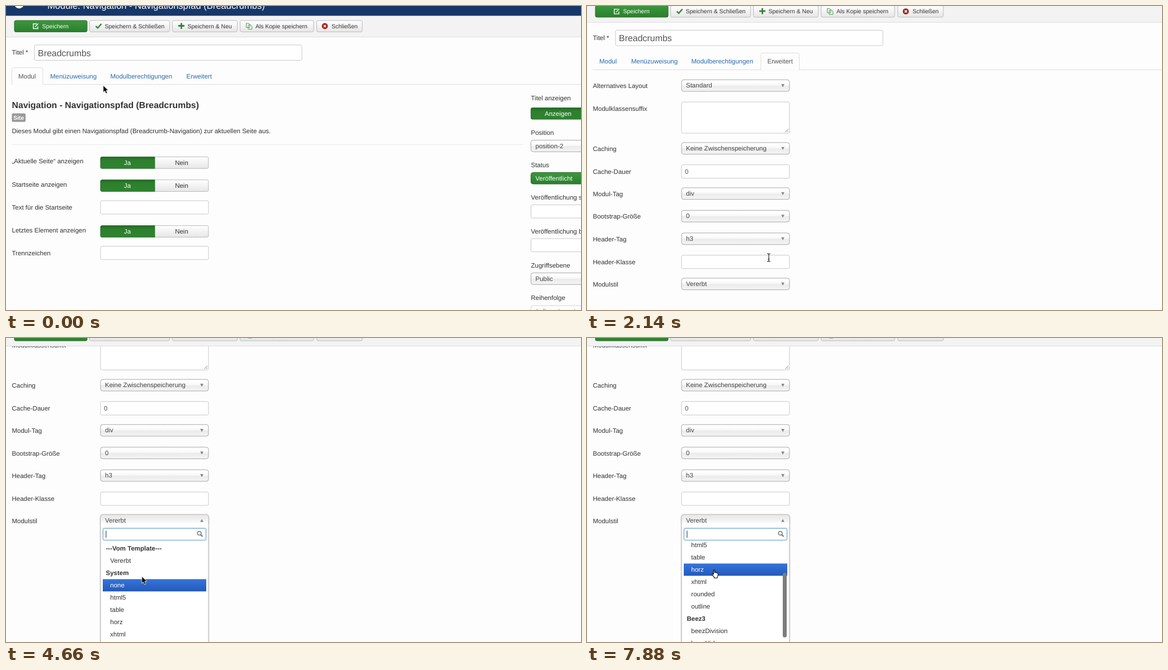
An HTML page for the animation above (8000 ms loop, 1028 px wide and 545 px high).

```html
<!DOCTYPE html>
<html lang="de">
<head>
<meta charset="utf-8">
<title>Modul bearbeiten</title>
<style>
  html, body { margin: 0; width: 100%; height: 100%; overflow: hidden; background: #fdfdfd; }
  svg { display: block; width: 1028px; height: 545px; }
  text { font-family: "Liberation Sans", Arial, sans-serif; white-space: pre; text-rendering: geometricPrecision; }
</style>
</head>
<body>
<svg id="stage" viewBox="0 0 1028 545" xmlns="http://www.w3.org/2000/svg">
  <defs>
    <linearGradient id="green" x2="0" y2="1"><stop stop-color="#3c973d"/><stop offset="1" stop-color="#2b7f2d"/></linearGradient>
    <linearGradient id="pressed" x2="0" y2="1"><stop stop-color="#236a25"/><stop offset=".3" stop-color="#2d802e"/><stop offset="1" stop-color="#2f8330"/></linearGradient>
    <linearGradient id="grey" x2="0" y2="1"><stop stop-color="#fff"/><stop offset="1" stop-color="#e6e6e6"/></linearGradient>
    <linearGradient id="select" x2="0" y2="1">
      <stop offset=".2" stop-color="#fff"/><stop offset=".5" stop-color="#f6f6f6"/>
      <stop offset=".52" stop-color="#ebebeb"/><stop offset="1" stop-color="#f4f4f4"/>
    </linearGradient>
    <linearGradient id="open" x2="0" y2="1">
      <stop offset=".2" stop-color="#ebebeb"/><stop offset=".55" stop-color="#f6f6f6"/><stop offset=".8" stop-color="#fff"/>
    </linearGradient>
    <linearGradient id="blue" x2="0" y2="1"><stop stop-color="#3674da"/><stop offset=".9" stop-color="#265cbd"/></linearGradient>
    <clipPath id="listClip"><path d="M170 366H361V581H170Z"/></clipPath>
  </defs>
  <g id="page">
    <g id="form"></g>
    <g id="tabs"></g>
    <g id="modul"></g>
    <g id="advanced"></g>
    <g id="drop" transform="translate(0 197.1)"></g>
  </g>
  <g id="bar"></g>
  <g id="cursors">
    <path id="arrow" fill="#000" stroke="#fff" stroke-width=".8" d="M.4 .4V12.8L3.2 10.2L5.3 15L7.6 14L5.5 9.3H9.3Z"/>
    <path id="hand" fill="#fff" stroke="#000" stroke-width="1.1" stroke-linejoin="round"
      d="M3.2 8.5V1.4Q4.2 -.3 5.2 1.4V5.2Q6.3 4.2 7.2 5.5Q8.5 4.6 9.3 6Q10.6 5.4 11.2 6.8V10Q11 12 9.9 13.2V15H4.4V13.4Q2.4 11.4 .6 8.8Q.8 7 2.2 7.8Z"/>
    <path id="beam" fill="none" stroke="#222" stroke-width="1.2" d="M-3 -7Q0 -7 0 -5.5Q0 -7 3 -7M0 -5.5V5.5M-3 7Q0 7 0 5.5Q0 7 3 7M-1.6 2.5H1.6"/>
  </g>
</svg>
<script>
const $ = id => document.getElementById(id);

const text = (x, y, s, { size = 11.5, fill = '#333', bold = false, anchor = 'start' } = {}) =>
  `<text x="${x}" y="${y}" font-size="${size}" fill="${fill}" text-anchor="${anchor}"${bold ? ' font-weight="700"' : ''}>${s.replace(/&/g, '&amp;')}</text>`;
const rect = (x, y, w, h, fill, stroke = 'none', r = 2.6) =>
  `<rect x="${x}" y="${y}" width="${w}" height="${h}" rx="${r}" fill="${fill}" stroke="${stroke}"/>`;
const path = (d, fill, stroke = 'none', width = 1) =>
  `<path d="${d}" fill="${fill}" stroke="${stroke}" stroke-width="${width}"/>`;

const label = (x, y, s) => text(x, y + 4, s);
const input = (x, y, w, h, s = '') => rect(x, y, w, h, '#fff', '#c8c8c8') + text(x + 6, y + 16, s, { fill: '#555' });
const select = (y, s, x = 169) =>
  rect(x, y - 10.3, 193, 20.8, 'url(#select)', '#a8a8a8', 4) +
  text(x + 8, y + 3.8, s, { fill: '#444' }) +
  path(`M${x + 178.2} ${y - 2.5}h5.8l-2.9 5.4z`, '#888');
const toggle = y =>
  rect(169, y - 10.3, 193, 20.8, 'url(#grey)', '#bbb') +
  path(`M266 ${y - 10.3}H171.6Q169 ${y - 10.3} 169 ${y - 7.7}V${y + 8}Q169 ${y + 10.5} 171.6 ${y + 10.5}H266Z`, 'url(#pressed)', '#2a6d2b', .8) +
  text(217, y + 3.8, 'Ja', { fill: '#fff', anchor: 'middle' }) +
  text(314, y + 3.8, 'Nein', { anchor: 'middle' });

// Header and sticky toolbar
const buttons = [
  [15, 130, 64.5, 'Speichern'], [149.5, 143, 176.5, 'Speichern & Schließen'], [297.5, 116, 324.5, 'Speichern & Neu'],
  [418.5, 131.5, 446, 'Als Kopie speichern'], [555.5, 81.5, 582, 'Schließen']
];
$('bar').innerHTML =
  path('M0 0H1028V56H0Z', '#f3f3f3') + path('M0 55.7H1028', 'none', '#dedede') + path('M0 -20H1028V17.4H0Z', '#173768') +
  '<circle cx="23.5" cy="-4" r="8.5" fill="#fff"/>' +
  text(74, 4.6, 'Module: Navigation - Navigationspfad (Breadcrumbs)', { size: 16.55, fill: '#fff' }) +
  buttons.map(([x, w, tx, s], i) =>
    rect(x, 26, w, 20.4, i ? 'url(#grey)' : 'url(#green)', i ? '#bcbcbc' : '#2a6d2b') +
    text(tx, 39.7, s, { size: 10.5, fill: i ? '#333' : '#fff' })).join('') +
  path('M55 32H48.8V40.5H57V36.5M52 37.5L57.5 31.5', 'none', '#fff', 1.4) +
  path('M160.5 36L164 39.5L170.5 32', 'none', '#378137', 2.4) +
  path('M308 35.5H319M313.5 30.5V41', 'none', '#378137', 2.8) +
  path('M429.5 31H434L436 33V38.5H429.5ZM433 34H437.5L439.7 36V41.5H433Z', '#f4f8f4', '#4f9550', 1) +
  '<circle cx="570" cy="36" r="5.4" fill="#a5211b"/>' + path('M568 34L572 38M572 34L568 38', 'none', '#fff', 1.5);

$('form').innerHTML = label(10.5, 83, 'Titel *') + rect(51, 69.8, 478, 27.6, '#fff', '#c8c8c8') +
  text(57, 89.5, 'Breadcrumbs', { size: 15.95, fill: '#555' });

const tabs = [[10.5, 55.5, 22, 'Modul'], [67.5, 105.5, 79, 'Menüzuweisung'], [175, 134, 186.5, 'Modulberechtigungen'], [311, 68.5, 322.5, 'Erweitert']];
const drawTabs = (active, hover) => path('M10 140.7H1028', 'none', '#ddd') +
  tabs.map(([x, w, tx, s], i) => {
    const shape = `M${x} 141.2V114Q${x} 110.5 ${x + 3.5} 110.5H${x + w - 3.5}Q${x + w} 110.5 ${x + w} 114V141.2`;
    const back = i === active ? path(shape, '#fdfdfd', '#ddd') : i === hover ? path(shape, '#eee') : '';
    return back + text(tx, 129.7, s, { fill: i === active ? '#555' : i === hover ? '#1b4a80' : '#2a6bb0' });
  }).join('');

// First tab
const publish = [[165, 'Titel anzeigen'], [227, 'Position'], [285, 'Status'], [343, 'Veröffentlichung starten'],
  [404, 'Veröffentlichung beenden'], [464.5, 'Zugriffsebene'], [522.5, 'Reihenfolge']];
$('modul').innerHTML =
  text(10.5, 183, 'Navigation - Navigationspfad (Breadcrumbs)', { size: 15.8, bold: true }) +
  rect(10.5, 192.5, 24.5, 15.3, '#999') + text(22.8, 204, 'Site', { size: 10.4, fill: '#fff', bold: true, anchor: 'middle' }) +
  label(10.5, 224.3, 'Dieses Modul gibt einen Navigationspfad (Breadcrumb-Navigation) zur aktuellen Seite aus.') +
  path('M10 248.5H925', 'none', '#eaeaea') +
  [[278, '„Aktuelle Seite“ anzeigen'], [319.5, 'Startseite anzeigen'], [360.5, 'Text für die Startseite'],
   [401.5, 'Letztes Element anzeigen'], [442.5, 'Trennzeichen']].map(([y, s]) => label(10.5, y, s)).join('') +
  [280.8, 322, 404].map(toggle).join('') + input(169, 349, 193, 24) + input(169, 430.7, 193, 24) +
  publish.map(([y, s]) => label(938.5, y, s)).join('') +
  rect(938.5, 182.5, 98, 20.5, 'url(#pressed)', '#2a6d2b') + text(963, 196.6, 'Anzeigen', { fill: '#fff' }) +
  select(250.8, 'position-2', 938.5) +
  rect(938.5, 298.5, 193, 20.6, 'url(#green)', '#2a6d2b', 4) + text(946.5, 312.8, 'Veröffentlicht', { fill: '#fff' }) +
  input(938.5, 356.5, 193, 23.6) + input(938.5, 417, 193, 23.6) +
  select(488.8, 'Public', 938.5) + rect(938.5, 537, 193, 20.8, '#fdfdfd', '#d4d4d4', 4) +
  text(946.5, 550.6, '1. Breadcrumbs', { fill: '#aaa' });

// Fourth tab
const rows = [[169.3, 'Alternatives Layout', 'Standard'], [210, 'Modulklassensuffix'], [282, 'Caching', 'Keine Zwischenspeicherung'],
  [322.8, 'Cache-Dauer'], [363, 'Modul-Tag', 'div'], [403.5, 'Bootstrap-Größe', '0'], [444, 'Header-Tag', 'h3'],
  [484.8, 'Header-Klasse'], [525, 'Modulstil', 'Vererbt']];
$('advanced').innerHTML =
  rows.map(([y, name, value]) => label(10.5, y + .3, name) + (value ? select(y - .4, value) : '')).join('') +
  rect(169, 198.4, 193, 56, '#fff', '#c8c8c8') + path('M354.5 252.5L360 247M358 252.5L360 250.5', 'none', '#777') +
  input(169, 311, 193, 24.2, '0') + input(169, 473.2, 193, 24);

// Dropdown; names starting with # are group titles
const options = ['#---Vom Template---', 'Vererbt', '#System', 'none', 'html5', 'table', 'horz', 'xhtml', 'rounded', 'outline',
  '#Beez3', 'beezDivision', 'beezHide', 'beezTabs', '#Protostar', 'no', 'well'];
const drawDrop = (caret, hot, scroll, thumb) =>
  rect(167.8, 315.8, 195.4, 260, 'none', 'rgba(0,0,0,.1)', 5) +
  path('M169 590V321Q169 317 173 317H358Q362 317 362 321V590', '#fff', '#aaa') +
  path('M169.5 337.5V321Q169.5 317.5 173 317.5H358Q361.5 317.5 361.5 321V337.5Z', 'url(#open)') +
  text(177, 331.3, 'Vererbt', { fill: '#444' }) + path('M347.2 329.8h5.8l-2.9-5.4z', '#888') +
  rect(172.7, 340.4, 185.6, 22.8, 'none', '#bcd9ee', 3) + rect(173.7, 341.4, 183.6, 20.8, '#fff', '#76a9d0', 1.5) +
  '<circle cx="345.6" cy="350" r="3.3" fill="none" stroke="#777" stroke-width="1.5"/>' + path('M348 352.4L351.5 356', 'none', '#777', 2.2) +
  (caret ? path('M178.9 345.5V358', 'none', '#222') : '') +
  '<g clip-path="url(#listClip)">' + options.map((s, i) => {
    const y = 377.3 + 22 * i - scroll, group = s[0] === '#';
    return (i === hot ? rect(173, y - 11, 185, 22, 'url(#blue)', 'none', 0) : '') +
      text(group ? 178.5 : 186.3, y + 4, group ? s.slice(1) : s, { bold: group, fill: i === hot ? '#fff' : '#333' });
  }).join('') + (thumb ? rect(350, 370 + scroll * .54, 7, 116, '#7c7c7c', 'none', 3.5) : '') + '</g>';

// Each step overrides part of the state before it
const steps = [
  { at: 0, y: 0, pointer: 'arrow', px: 173.5, py: 142, tab: 0, hover: -1, open: false, caret: false, hot: 1, list: 0, thumb: false },
  { at: 360, pointer: 'hand', px: 265, py: 127, hover: 2 },
  { at: 720, px: 328, py: 129, hover: 3 },
  { at: 1070, tab: 3, hover: -1 },
  { at: 1430, pointer: 'arrow', px: 362.5, py: 259.5 },
  { at: 1780, y: 24.6 },
  { at: 2140, y: 26.4, pointer: 'beam', px: 325, py: 451 },
  { at: 2500, px: 339, py: 468.5 },
  { at: 2860, pointer: 'arrow', px: 359.5, py: 514.5 },
  { at: 3220, px: 340.5, py: 504.5 },
  { at: 3580, open: true, caret: true },
  { at: 3940, y: 105.6, px: 359.5, py: 477.5 },
  { at: 4300, y: 197.1, caret: false },
  { at: 4660, px: 242.5, py: 427, caret: true, hot: 3 },
  { at: 5010, caret: false, hot: -1, list: 22, thumb: true },
  { at: 5370, list: 136 },
  { at: 5720, caret: true },
  { at: 6080, caret: false, list: 94 },
  { at: 6440, caret: true, hot: 6, list: 83 },
  { at: 6800, pointer: 'hand', px: 223, py: 415.3 },
  { at: 7160, caret: false, hot: 5, list: 64 },
  { at: 7520, caret: true, list: 78 },
  { at: 7880, hot: 6, list: 94 }
];
const states = [];
steps.forEach((step, i) => states.push({ ...states[i - 1], ...step }));

const show = (id, on) => $(id).setAttribute('display', on ? 'inline' : 'none');
const move = (id, x, y) => $(id).setAttribute('transform', `translate(${x} ${y})`);

function draw(s) {
  move('page', 0, -s.y);
  move('bar', 0, -Math.min(s.y, 41.4));
  $('tabs').innerHTML = drawTabs(s.tab, s.hover);
  show('modul', s.tab === 0);
  show('advanced', s.tab === 3);
  $('drop').innerHTML = s.open ? drawDrop(s.caret, s.hot, s.list, s.thumb) : '';
  ['arrow', 'hand', 'beam'].forEach(id => show(id, id === s.pointer));
  move('cursors', s.px, s.py);
}

const start = performance.now();
let current;
function tick() {
  const t = (performance.now() - start) % 8000;
  const state = states.filter(s => s.at <= t).pop();
  if (state !== current) draw(current = state);
  requestAnimationFrame(tick);
}
tick();
</script>
</body>
</html>
```
